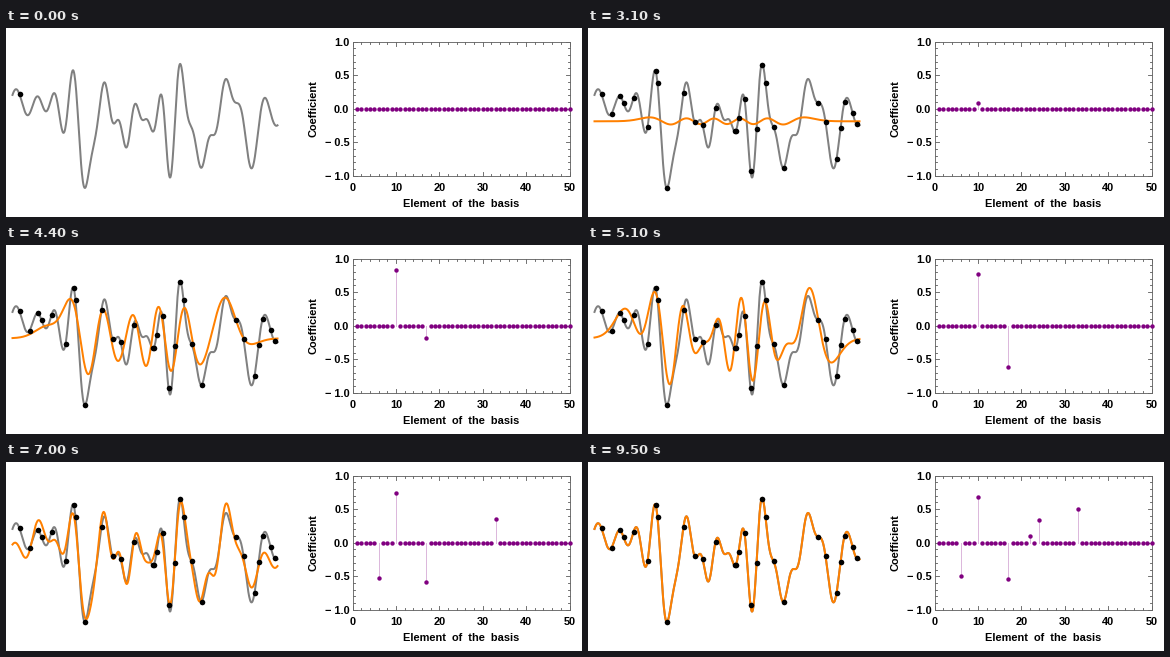
Animation, 576 px wide and 189 px high, one loop 9600 ms. Source, as a matplotlib script:

```python
import numpy as np
import matplotlib.pyplot as plt
from matplotlib.animation import FuncAnimation

W, H, DPI = 576, 189, 72
LEFT, RIGHT, TOP, BOTTOM = 347, 564, 14, 148.4
STEPS = 11

# Sparse signal: basis element -> weight, in the order the fit finds them
SIGNAL = {10: 0.687, 17: -0.537, 6: -0.493, 33: 0.507, 24: 0.343, 22: 0.104}
ORDER = list(SIGNAL)

# Scattered positions where the signal is sampled
SAMPLE_X = np.array([14, 24, 32, 36, 46, 60, 68, 70, 79, 96,
                     107, 115, 128, 147, 148, 151, 157, 163, 169, 174,
                     178, 186, 196, 230, 238, 249, 253, 257, 265, 269])


def hermite(n_max, x):
    """Orthonormal Hermite functions 0..n_max, one per row."""
    psi = [np.pi ** -0.25 * np.exp(-x * x / 2)]
    psi.append(np.sqrt(2) * x * psi[0])
    for n in range(1, n_max):
        psi.append(np.sqrt(2 / (n + 1)) * x * psi[n]
                   - np.sqrt(n / (n + 1)) * psi[n - 1])
    return np.array(psi)


def basis_at(px):
    return hermite(max(ORDER), (px - 139.5) / 18.93)[ORDER]


def curve_y(weights, basis):
    return 93.8 - 86.5 * (weights @ basis)


def refit(count):
    """Least-squares weights using only the first `count` elements."""
    weights = np.zeros(len(ORDER))
    if count:
        weights[:count] = np.linalg.lstsq(
            sample_basis[:count].T, true_weights @ sample_basis, rcond=None)[0]
    return weights


def chart_x(n):
    return LEFT + (RIGHT - LEFT) * n / 50


def chart_y(c):
    return (TOP + BOTTOM) / 2 - (BOTTOM - TOP) / 2 * c


curve_x = np.linspace(7, 272, 600)
curve_basis = basis_at(curve_x)
sample_basis = basis_at(SAMPLE_X)
true_weights = np.array(list(SIGNAL.values()))
sample_y = curve_y(true_weights, sample_basis)
stages = [refit(count) for count in range(len(ORDER) + 1)]

plt.rcParams["font.family"] = "Liberation Sans"
fig = plt.figure(figsize=(W / DPI, H / DPI), dpi=DPI, facecolor="white")
ax = fig.add_axes([0, 0, 1, 1])
ax.set_xlim(0.5, W + 0.5)
ax.set_ylim(H + 0.5, 0.5)
ax.axis("off")


def rule(xs, ys):
    ax.plot(xs, ys, color="0.4", lw=0.9, zorder=1)


def label(px, py, text, **kw):
    ax.text(px, py, text, size=11, weight="bold", color="black", **kw)


rule([LEFT, RIGHT, RIGHT, LEFT, LEFT], [TOP, TOP, BOTTOM, BOTTOM, TOP])
for n in range(0, 51, 2):
    major = n % 10 == 0
    px, size = chart_x(n), 4 if major else 2
    rule([px, px], [BOTTOM, BOTTOM - size])
    rule([px, px], [TOP, TOP + size])
    if major:
        label(px, 163, str(n), ha="center", va="baseline")
for i in range(-10, 11):
    major = i % 5 == 0
    py, size = chart_y(i / 10), 4 if major else 2
    rule([LEFT, LEFT + size], [py, py])
    rule([RIGHT, RIGHT - size], [py, py])
    if major:
        sign = "\u2212 " if i < 0 else ""
        label(344, py + 4, f"{sign}{abs(i) / 10:.1f}", ha="right", va="baseline")
label(455.5, 179, "Element  of  the  basis", ha="center", va="baseline")
label(308, 81, "Coefficient", ha="center", va="center", rotation=90)

ax.plot(curve_x, curve_y(true_weights, curve_basis), color="#808080", lw=2, zorder=2)
fit, = ax.plot([], [], color="#ff8000", lw=2, zorder=3)
samples, = ax.plot([], [], "o", color="black", ms=5.6, mew=0, zorder=4)

elements = np.arange(1, 51)
stems = [ax.plot([], [], color="#dcb8dc", lw=1, zorder=2)[0] for _ in ORDER]
coefs, = ax.plot([], [], "o", color="#800080", ms=4.4, mew=0, zorder=5)


def update(k):
    samples.set_data(SAMPLE_X[:k + 1], sample_y[:k + 1])
    weights = stages[0]
    if k < len(SAMPLE_X):
        fit.set_data([], [])
    else:
        stage, step = divmod(k - len(SAMPLE_X), STEPS)
        t = step / (STEPS - 1)
        weights = (1 - t) * stages[stage] + t * stages[stage + 1]
        fit.set_data(curve_x, curve_y(weights, curve_basis))

    values = np.zeros(len(elements))
    for stem, n, c in zip(stems, ORDER, weights):
        values[n - 1] = c
        stem.set_data([chart_x(n)] * 2, [chart_y(0), chart_y(c)])
    coefs.set_data(chart_x(elements), chart_y(values))
    return [fit, samples, coefs, *stems]


anim = FuncAnimation(fig, update, frames=len(SAMPLE_X) + STEPS * len(ORDER),
                     interval=100, repeat=True, repeat_delay=0)
plt.show()
```
